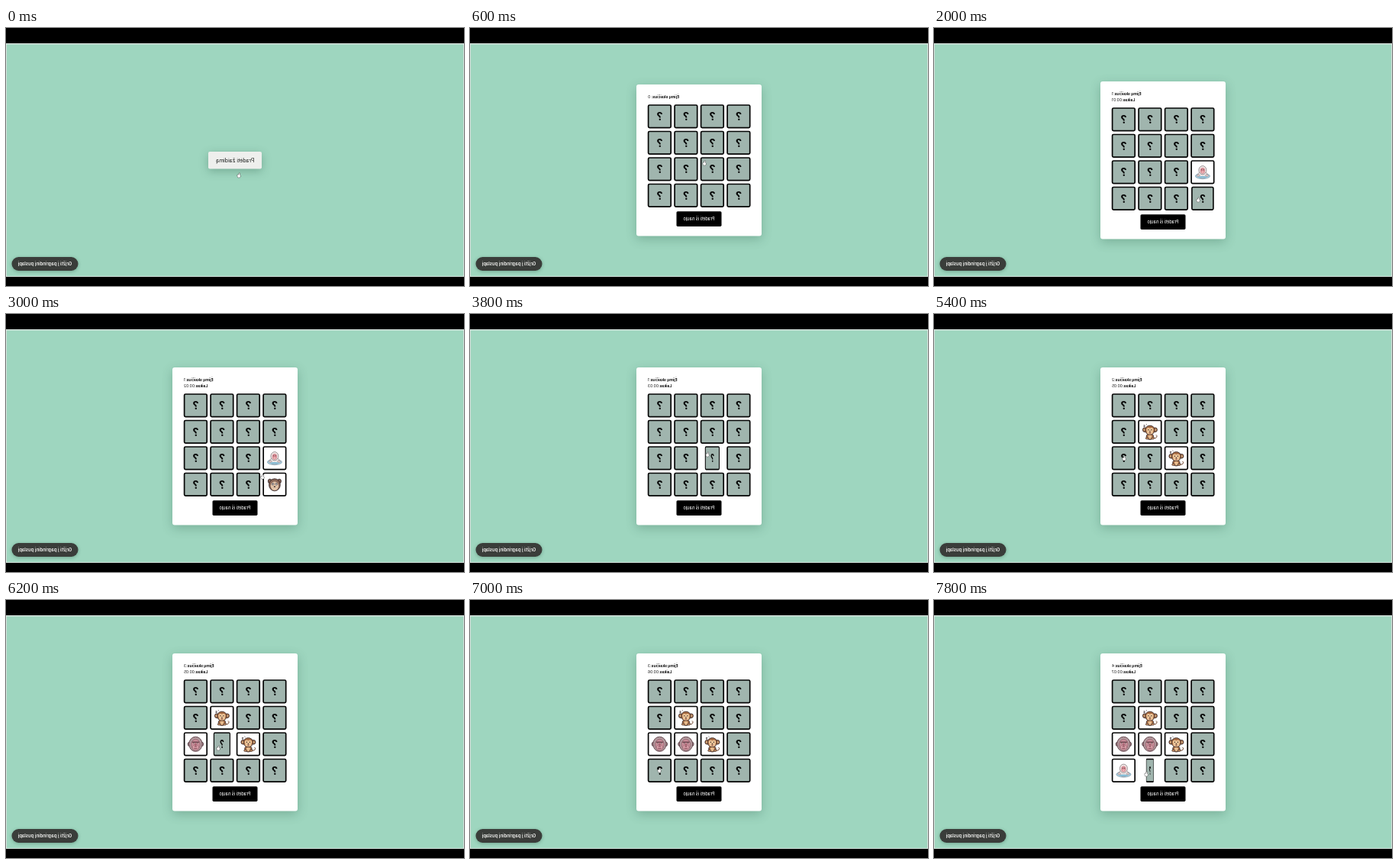
These frames come from a looping animation (600 by 338 pixels, 8 s). An HTML page with a canvas:

```html
<!DOCTYPE html>
<html lang="lt">
<head>
<meta charset="utf-8">
<title>Memory game</title>
<style>
html, body { margin: 0; width: 100%; height: 100%; overflow: hidden; background: #000; }
canvas { display: block; width: 600px; height: 338px; }
</style>
</head>
<body>
<canvas id="stage"></canvas>
<script>
const canvas = document.getElementById('stage');
const ctx = canvas.getContext('2d');
const ratio = window.devicePixelRatio || 1;
canvas.width = 600 * ratio;
canvas.height = 338 * ratio;

const LOOP = 8000, STEP = 200, FLIP = 500;
const GAME_START = 400;
const SIZE = 31.2, PITCH = 34.5, LEFT = 232.8;
const INK = '#2b2024';
const FONT = 'Inter, "Open Sans", sans-serif';

// col, row, face, time opened, time closed again
const turns = [
  [3, 2, bather, 1200, 2950],
  [3, 3, lemur, 1900, 2950],
  [2, 2, monkey, 3622],
  [1, 1, monkey, 4250],
  [0, 2, baboon, 5350],
  [1, 2, baboon, 6037],
  [0, 3, bather, 7000],
  [1, 3, lemur, 7585]
];
const moveTimes = [1900, 4250, 6037, 7585];

// time, x, y
const pointerPath = [
  [0, 305, 193], [300, 307, 177], [700, 307, 177], [1150, 351, 189],
  [1350, 351, 189], [1850, 346, 225], [2700, 346, 225], [3550, 311, 184],
  [3800, 311, 184], [4200, 276, 160], [4600, 269, 172], [5250, 249, 189],
  [5500, 249, 189], [6000, 278, 194], [6350, 278, 194], [6900, 248, 223],
  [7150, 248, 223], [7550, 278, 228], [8000, 278, 228]
];

const smooth = u => {
  u = Math.min(1, Math.max(0, u));
  return u * u * (3 - 2 * u);
};

function box(x, y, w, h, r, fill, stroke, line) {
  ctx.beginPath();
  ctx.roundRect(x, y, w, h, r);
  paint(fill, stroke, line);
}

function paint(fill, stroke, line = 0.8) {
  if (fill) { ctx.fillStyle = fill; ctx.fill(); }
  if (stroke) { ctx.strokeStyle = stroke; ctx.lineWidth = line; ctx.stroke(); }
}

function oval(x, y, rx, ry, fill, stroke, line) {
  ctx.beginPath();
  ctx.ellipse(x, y, rx, ry, 0, 0, Math.PI * 2);
  paint(fill, stroke, line);
}

function pair(dx, y, rx, ry, fill, stroke, line) {
  oval(-dx, y, rx, ry, fill, stroke, line);
  oval(dx, y, rx, ry, fill, stroke, line);
}

function withShadow(color, blur, dy, draw) {
  ctx.save();
  ctx.shadowColor = color;
  ctx.shadowBlur = blur * ratio;
  ctx.shadowOffsetY = dy * ratio;
  draw();
  ctx.restore();
}

// Text seen in a mirror; returns its width.
function mirrored(text, x, y, size, weight, color, align = 'center') {
  ctx.save();
  ctx.translate(x, y);
  ctx.scale(-1, 1);
  ctx.font = `${weight} ${size}px ${FONT}`;
  ctx.textAlign = align;
  ctx.textBaseline = 'alphabetic';
  ctx.fillStyle = color;
  ctx.fillText(text, 0, 0);
  const width = ctx.measureText(text).width;
  ctx.restore();
  return width;
}

function counter(label, value, y) {
  const width = mirrored(value, 233, y, 5, 400, '#111', 'right');
  mirrored(label, 233 + width, y, 5, 700, '#111', 'right');
}

function bather() {
  oval(0, 5.2, 9.6, 3.7, '#a9cfe0', '#7894a5', 0.6);
  oval(0, 3.5, 6, 4.6, '#eee5e4', '#806f74', 0.6);
  oval(0, -2.6, 5, 5.6, '#f0e8e6', '#786b70', 0.7);
  oval(0, -2, 3.2, 3.9, '#d88d96');
  pair(1.3, -3, 0.5, 0.5, INK);
  oval(0, -0.1, 1.5, 1.1, '#efb7b8');
  pair(5.7, 4.4, 2, 1.2, '#e9d6d3', '#806f74', 0.5);
  oval(0, 6.5, 5.4, 1.3, '#85bdd6');
}

function monkey() {
  ctx.beginPath();
  ctx.arc(6.8, 6, 2.3, -1, 2.4);
  paint(null, '#70442c', 1);
  oval(0, 6.2, 4.7, 4, '#a66b43', INK);
  oval(0, 6.6, 2.5, 2.6, '#e9bd8e');
  pair(3.7, 8.5, 2, 1.3, '#c98c5d', INK, 0.6);
  pair(6.9, -2.6, 2.6, 2.8, '#a66b43', INK);
  pair(6.9, -2.5, 1.3, 1.6, '#e9bd8e');
  oval(0, -2.2, 6.3, 6, '#a66b43', INK);
  pair(2, -2.5, 2.6, 2.8, '#edc598');
  oval(0, 0.4, 4.1, 2.8, '#edc598');
  pair(2, -2.5, 0.65, 0.8, INK);
  oval(0, -0.5, 0.9, 0.6, INK);
  oval(0, 1.5, 1.3, 0.7, '#83433c');
  ctx.beginPath();
  ctx.moveTo(-8.5, -8.5);
  ctx.lineTo(-6.5, -8.5);
  ctx.lineTo(-8.2, -6.7);
  ctx.lineTo(-6.2, -6.7);
  ctx.moveTo(-5, -10);
  ctx.lineTo(-3.8, -9);
  paint(null, INK, 0.7);
}

function baboon() {
  pair(8.3, 0, 1.9, 2.6, '#bd8d94', INK, 0.7);
  oval(0, 0, 8.7, 9.6, '#b49a9e', '#66474f', 1);
  oval(0, 0.8, 5.9, 7.3, '#c88c98', '#805761', 0.6);
  oval(0, 4.4, 4.2, 3.4, '#d79ba5', '#805761', 0.5);
  box(-4.8, -3.2, 9.6, 1.4, 0.7, '#714852');
  pair(2.5, -1, 1.1, 0.8, '#f1d5d0');
  pair(2.5, -1, 0.55, 0.7, INK);
  box(-1.1, -1.3, 2.2, 5, 1, '#aa6675');
  pair(0.9, 3.3, 0.5, 0.4, INK);
  box(-2.2, 5.5, 4.4, 0.7, 0.3, '#6f3c48');
}

function lemur() {
  pair(6.2, -4.3, 2.4, 2.8, '#8b6757', INK);
  oval(0, 0.5, 7.4, 8, '#8b6757', INK);
  oval(0, 2, 5.2, 5.8, '#e2c3a8');
  pair(2.3, -0.5, 1.4, 1.5, '#fff', INK, 0.5);
  pair(2.3, -0.5, 0.6, 0.7, INK);
  oval(0, 3, 1.2, 0.8, INK);
}

function drawCard(col, row, top, t) {
  let turn = 0, face = null;
  for (const [c, r, art, open, close = Infinity] of turns) {
    if (c === col && r === row && t >= open) {
      turn = smooth((t - open) / FLIP) - smooth((t - close) / FLIP);
      face = art;
    }
  }
  const squeeze = Math.abs(Math.cos(turn * Math.PI));
  const half = SIZE / 2;
  ctx.save();
  ctx.translate(LEFT + col * PITCH + half, top + row * PITCH + half);
  ctx.scale(Math.max(squeeze, 0.01), 1);
  const shown = turn > 0.5;
  box(-half + 0.8, -half + 0.8, SIZE - 1.6, SIZE - 1.6, 1.6,
      shown ? '#fff' : '#a0b5ae', '#050505', 1.7);
  if (shown) face();
  else mirrored('?', 0, 5.2, 14.5, 700, '#080808');
  ctx.restore();
}

function drawGame(t) {
  const seconds = Math.floor((t - GAME_START) / 1000);
  const moves = moveTimes.filter(m => t >= m).length;
  const timed = seconds > 0;
  const top = timed ? 70 : 74;
  const cards = timed ? 104.2 : 100.2;

  withShadow('rgba(40,90,70,0.3)', 14, 4, () =>
    box(218, top, 164, cards + 172.3 - top, 3, '#fff'));
  counter('Ėjimų skaičius:', moves ? String(moves) : ' 0', timed ? 88.3 : 92);
  if (timed) counter('Laikas:', '00:0' + seconds, 96);

  for (let i = 0; i < 16; i++) drawCard(i % 4, i >> 2, cards, t);

  box(270.5, cards + 140, 59, 19.7, 1.6, '#000');
  mirrored('Pradėti iš naujo', 300, cards + 151.7, 5.6, 500, '#eee');
}

function drawStart() {
  withShadow('rgba(40,90,70,0.35)', 12, 3, () =>
    box(265, 162, 70, 22.5, 2, '#eeefed'));
  mirrored('Pradėti žaidimą', 300.3, 175.5, 6.9, 400, '#171a18');
}

function drawPointer(t) {
  const i = pointerPath.findIndex(p => p[0] > t);
  const [t0, x0, y0] = pointerPath[i - 1];
  const [t1, x1, y1] = pointerPath[i];
  const k = smooth((t - t0) / (t1 - t0));
  ctx.save();
  ctx.translate(x0 + (x1 - x0) * k, y0 + (y1 - y0) * k);
  ctx.beginPath();
  ctx.moveTo(0.2, -2.8);
  ctx.lineTo(1.4, -2.8);
  ctx.lineTo(1.5, 0.1);
  ctx.lineTo(2.2, 0.6);
  ctx.lineTo(1.5, 2.7);
  ctx.lineTo(-1.4, 2.7);
  ctx.lineTo(-2, -0.5);
  ctx.lineTo(0.1, -0.7);
  ctx.closePath();
  ctx.lineJoin = 'round';
  paint(null, '#444', 1);
  paint('#fff');
  ctx.restore();
}

function draw(t) {
  ctx.setTransform(ratio, 0, 0, ratio, 0, 0);
  ctx.fillStyle = '#000';
  ctx.fillRect(0, 0, 600, 338);
  ctx.fillStyle = '#d3e0da';
  ctx.fillRect(0, 20, 600, 306);
  ctx.fillStyle = '#9ed6bf';
  ctx.fillRect(1, 21.5, 598, 303.5);

  if (t < GAME_START) drawStart();
  else drawGame(t);

  withShadow('rgba(30,70,50,0.35)', 4, 1, () =>
    box(7.5, 300, 87, 18, 9, '#3a3d3a'));
  mirrored('Grįžti į pagrindinį puslapį', 51, 311.3, 5.9, 600, '#f4f4f2');
  drawPointer(t);
}

const began = performance.now();
function tick() {
  const t = Math.max(0, performance.now() - began) % LOOP;
  draw(Math.floor(t / STEP) * STEP);
  requestAnimationFrame(tick);
}
tick();
</script>
</body>
</html>
```
